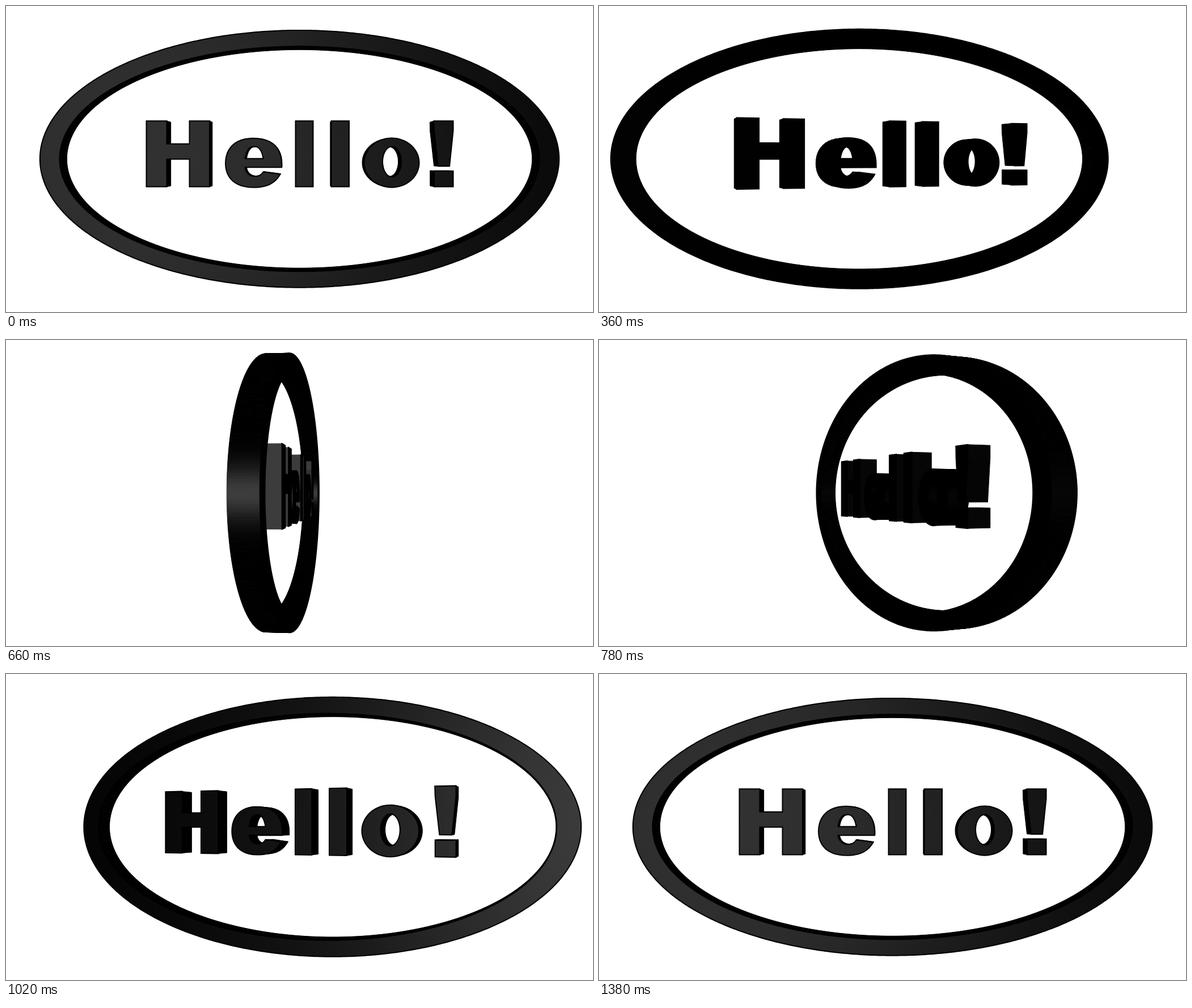
Write an HTML page with a canvas that moves like this. It is 1035 by 541 pixels and loops after 1410 ms.

```html
<!DOCTYPE html>
<html lang="en">
<head>
<meta charset="utf-8">
<title>Hello!</title>
<style>
  html, body { margin: 0; width: 100%; height: 100%; overflow: hidden; background: #fff; }
  canvas { display: block; }
</style>
</head>
<body>
<canvas id="stage" width="1035" height="541" role="img" aria-label="Hello!"></canvas>
<script>
const ctx = document.getElementById('stage').getContext('2d');
const CENTER_X = 517.5, CENTER_Y = 270.3;
const CAMERA = 1150, FRONT = 3, BACK = -33;
const FRAME_MS = 30, FRAMES = 47, HALF = 23;

// Outer contours run clockwise on screen, holes counter-clockwise.
function ellipse(cx, cy, rx, ry, steps, dir = 1) {
  return Array.from({ length: steps }, (_, i) => {
    const a = dir * i / steps * 2 * Math.PI;
    return [cx + rx * Math.cos(a), cy + ry * Math.sin(a)];
  });
}

const box = (l, t, r, b) => [[l, t], [r, t], [r, b], [l, b]];

// Nodes hold two numbers for a line, six for a cubic curve.
function outline(nodes) {
  const points = [];
  for (const n of nodes) {
    if (n.length === 2) { points.push(n); continue; }
    const [x0, y0] = points[points.length - 1];
    const [x1, y1, x2, y2, x3, y3] = n;
    for (let i = 1; i <= 12; i++) {
      const t = i / 12, u = 1 - t;
      const mix = (a, b, c, d) => a*u*u*u + 3*b*u*u*t + 3*c*u*t*t + d*t*t*t;
      points.push([mix(x0, x1, x2, x3), mix(y0, y1, y2, y3)]);
    }
  }
  return points;
}

const TOP = -67, BASE = 49.3;
const contours = [
  ellipse(0, 0, 457.7, 227.4, 600),
  ellipse(0, 0, 423, 199, 600, -1),
  // H
  [[-270, TOP], [-234, TOP], [-234, -26.5], [-194, -26.5], [-194, TOP], [-158.5, TOP],
   [-158.5, BASE], [-194, BASE], [-194, 0.5], [-234, 0.5], [-234, BASE], [-270, BASE]],
  // e
  outline([[-31.5, 15], [-96, 15], [-95, 25, -87, 31, -79, 31], [-72, 31, -67, 28, -64, 23],
    [-34, 27], [-43, 43, -57, 50.5, -81, 50.5], [-114, 50.5, -130.5, 33, -130.5, 8],
    [-130.5, -19, -113, -36.5, -82, -36.5], [-46, -36.5, -31.5, -18, -31.5, 10]]),
  outline([[-64, -0.5], [-66, -14, -71, -22, -80, -22], [-89, -22, -94, -14, -96, -0.5]]),
  // l l
  box(-7, TOP, 24, BASE),
  box(56, TOP, 87.5, BASE),
  // o
  ellipse(162.5, 6.8, 48.5, 43.6, 64),
  ellipse(163, 5, 16.5, 27, 48, -1),
  // !
  [[237, TOP], [271, TOP], [271, -50], [264.5, 13], [244.5, 13], [237.5, -50]],
  box(237.5, 21.5, 271, BASE)
];

const gray = v => `rgb(${Math.round(v)},${Math.round(v)},${Math.round(v)})`;

function angleAt(frame) {
  const k = Math.min(frame, FRAMES - 1 - frame);
  const degrees = Math.min(89.9, k * k * (0.0935 + 0.00367 * k));
  return frame > HALF ? -degrees : degrees;
}

function frontPaint(degrees) {
  const sheen = 60 * Math.max(0, 1 - Math.max(0, degrees + 5) / 30);
  const x = CENTER_X - 300 - 45 * degrees, spread = 420;
  const paint = ctx.createRadialGradient(x, CENTER_Y, 0, x, CENTER_Y, 3 * spread);
  for (let i = 0; i <= 12; i++) {
    const d = i / 4;
    paint.addColorStop(i / 12, gray(i < 12 ? sheen * Math.exp(-d * d / 2) : 0));
  }
  return paint;
}

function trace(points) {
  points.forEach((p, i) => i ? ctx.lineTo(p.sx, p.sy) : ctx.moveTo(p.sx, p.sy));
  ctx.closePath();
}

function draw(frame) {
  const degrees = angleAt(frame), angle = degrees * Math.PI / 180;
  const c = Math.cos(angle), s = Math.sin(angle);

  const project = ([x, y], depth) => {
    const px = x * c + depth * s, pz = depth * c - x * s;
    const scale = (CAMERA - FRONT) / (CAMERA - pz);
    return { x: px, y, z: pz, sx: CENTER_X + px * scale, sy: CENTER_Y + y * scale };
  };

  const walls = [], glints = [];
  const caps = contours.map(points => {
    const front = points.map(p => project(p, FRONT));
    const back = points.map(p => project(p, BACK));
    points.forEach((p, i) => {
      const j = (i + 1) % points.length, q = points[j];
      const length = Math.hypot(q[0] - p[0], q[1] - p[1]);
      if (length < 1e-6) return;
      const nx = (q[1] - p[1]) / length, ny = (p[0] - q[0]) / length;
      const a = front[i], b = front[j];
      if (-nx * c * a.x - ny * a.y - nx * s * (CAMERA - a.z) <= 0) return;
      const mid = key => (a[key] + b[key] + back[i][key] + back[j][key]) / 4;
      walls.push({
        quad: [a, b, back[j], back[i]],
        distance: Math.hypot(mid('x'), mid('y'), CAMERA - mid('z')),
        color: gray(70 * Math.pow(Math.max(0, -nx * s), 30))
      });
      const glint = 62 * Math.pow(Math.max(0, (c - nx * s) / Math.SQRT2), 40);
      if (glint > 4) glints.push({ a, b, color: gray(glint) });
    });
    return front;
  });

  ctx.fillStyle = '#fff';
  ctx.fillRect(0, 0, 1035, 541);

  ctx.lineJoin = 'bevel';
  ctx.lineWidth = 1;
  walls.sort((m, n) => n.distance - m.distance);
  for (const { quad, color } of walls) {
    ctx.beginPath();
    trace(quad);
    ctx.fillStyle = ctx.strokeStyle = color;
    ctx.fill();
    ctx.stroke();
  }

  // All front faces share one plane, which lies before every wall.
  ctx.beginPath();
  caps.forEach(trace);
  ctx.fillStyle = frontPaint(degrees);
  ctx.fill('evenodd');
  ctx.lineJoin = 'miter';
  ctx.strokeStyle = '#000';
  ctx.lineWidth = 2;
  ctx.stroke();

  ctx.lineWidth = 1.2;
  for (const { a, b, color } of glints) {
    ctx.beginPath();
    ctx.moveTo(a.sx, a.sy);
    ctx.lineTo(b.sx, b.sy);
    ctx.strokeStyle = color;
    ctx.stroke();
  }
}

function tick() {
  draw(Math.floor(performance.now() / FRAME_MS) % FRAMES);
  requestAnimationFrame(tick);
}
tick();
</script>
</body>
</html>
```
